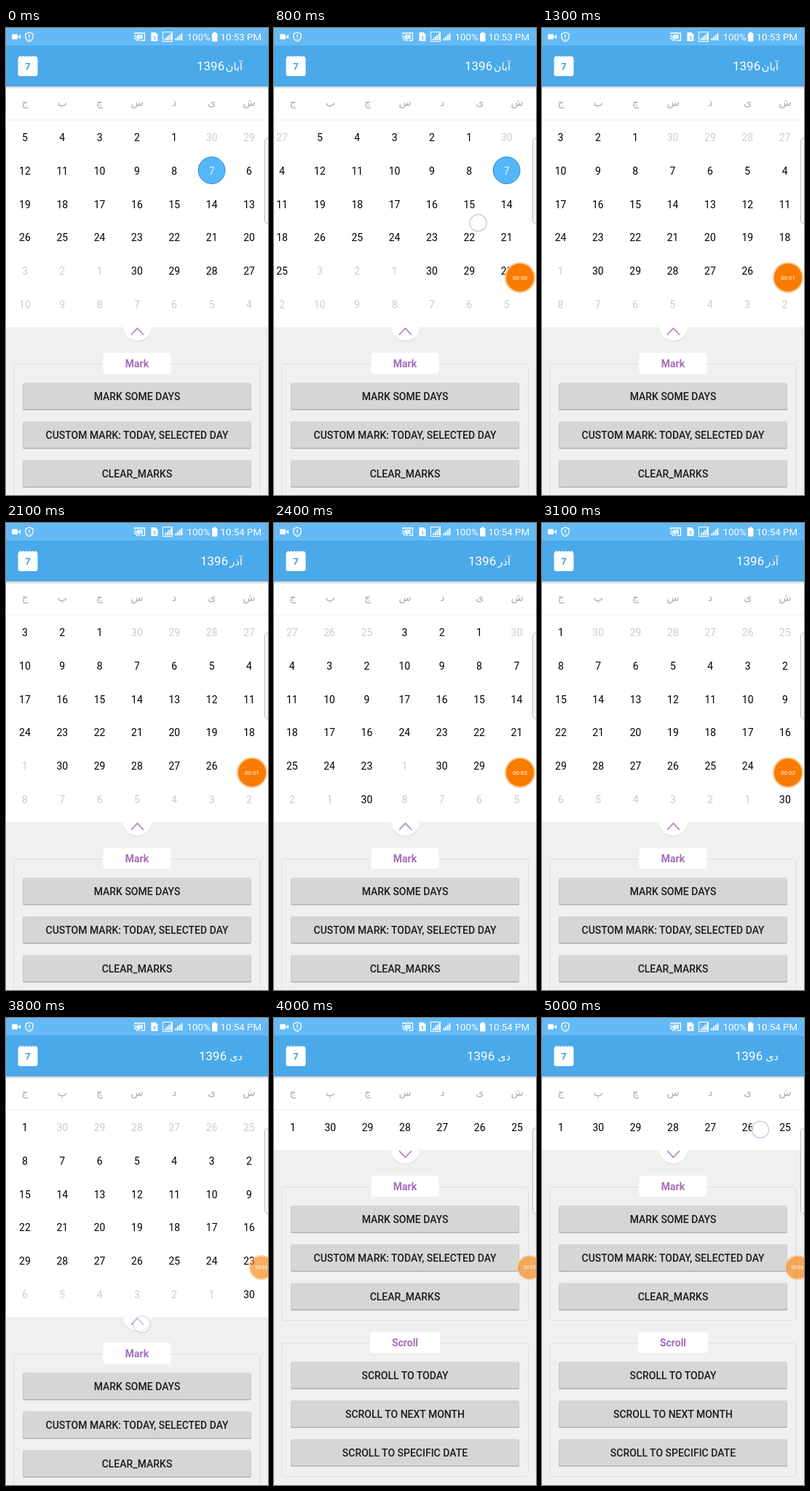
These frames come from a looping animation (360 by 640 pixels, 5.1 s). An HTML page:

```html
<!DOCTYPE html>
<html lang="en">
<head>
<meta charset="utf-8">
<title>Calendar swipe</title>
<style>
  html, body { margin: 0; width: 100%; height: 100%; overflow: hidden; background: #f0f0f0; }
  svg { display: block; width: 360px; height: 640px; font-family: Roboto, "DejaVu Sans", sans-serif; }
  .mid { text-anchor: middle; }
  .end { text-anchor: end; }
  .bold { font-weight: 700; }
  .arabic { font-family: "DejaVu Sans", sans-serif; }
</style>
</head>
<body>
<svg id="stage" viewBox="0 0 360 640">
  <defs>
    <linearGradient id="shade" x2="0" y2="1">
      <stop stop-color="#000" stop-opacity=".2"/>
      <stop offset="1" stop-color="#000" stop-opacity="0"/>
    </linearGradient>
  </defs>
</svg>
<script>
const LOOP = 5100, FRAME = 100, WIDTH = 360;
const stage = document.getElementById('stage');

function add(parent, tag, attrs = {}, text) {
  const el = document.createElementNS('http://www.w3.org/2000/svg', tag);
  for (const key in attrs) el.setAttribute(key, attrs[key]);
  if (text !== undefined) el.textContent = text;
  return parent.appendChild(el);
}
const rect = (p, x, y, width, height, fill, rx = 0, more = {}) =>
  add(p, 'rect', { x, y, width, height, fill, rx, ...more });
const label = (p, x, y, size, fill, text, cls = 'mid') =>
  add(p, 'text', { x, y, 'font-size': size, fill, class: cls }, text);
const path = (p, d, attrs) => add(p, 'path', { d, fill: 'none', ...attrs });
const circle = (p, cx, cy, r, attrs) => add(p, 'circle', { cx, cy, r, ...attrs });

const columnX = c => 334 - c * 51.35;
const rowY = r => 150.2 + r * 45.7;

// Calendar
rect(stage, 0, 80, 360, 335, '#fff');
[...'شیدسچپج'].forEach((day, c) => label(stage, columnX(c), 107, 14, '#ababab', day, 'mid arabic'));
rect(stage, 0, 125.5, 360, 1, '#eeeeee');

function addPage(lead, today) {
  const page = add(stage, 'g');
  const leading = [];
  for (let i = 0; i < 42; i++) {
    const x = columnX(i % 7), y = rowY(Math.floor(i / 7));
    const n = i - lead + 1;
    const inMonth = n > 0 && n <= 30;
    const isToday = n === today;
    if (isToday) circle(page, x, y - .8, 18.4, { fill: '#55b7f8', stroke: '#2588cb' });
    const color = isToday ? '#e2f3ff' : inMonth ? '#000' : '#cccccc';
    const cell = label(page, x, y + 5, 14, color, (n + 29) % 30 + 1);
    if (n <= 0) leading.push(cell);
  }
  return { page, leading };
}
const pages = [addPage(2, 7), addPage(4), addPage(6)];

// Lower panel
const panel = add(stage, 'g');
rect(panel, 0, 410, 360, 520, '#f0f0f0');
circle(panel, 180.5, 409.8, 20, { fill: '#dddddd' });
circle(panel, 180.5, 408.6, 20, { fill: '#fff' });
const lid = rect(panel, 155, 385, 51, 25, '#fff');
const chevron = path(panel, '', { stroke: '#b182c7', 'stroke-width': 1.8 });

function addGroup(top, title, titleWidth, buttons) {
  rect(panel, 10.5, top + .5, 339, 183, 'none', 4, { stroke: '#dedede' });
  rect(panel, 180 - titleWidth / 2, top - 15, titleWidth, 29, '#fff', 4);
  label(panel, 180, top + 5, 14, '#a66dbd', title, 'mid bold');
  buttons.forEach((text, i) => {
    const y = top + 26 + i * 53;
    rect(panel, 23, y + 1, 314, 37, '#bcbcbc', 2);
    rect(panel, 23.5, y, 313, 36, '#d6d6d6', 2);
    add(panel, 'text', { x: 180, y: y + 23.5, 'font-size': 14, 'font-weight': 500, fill: '#1c1c1c', class: 'mid' }, text);
  });
}
addGroup(460, 'Mark', 93, ['MARK SOME DAYS', 'CUSTOM MARK: TODAY, SELECTED DAY', 'CLEAR_MARKS']);
addGroup(674, 'Scroll', 96, ['SCROLL TO TODAY', 'SCROLL TO NEXT MONTH', 'SCROLL TO SPECIFIC DATE']);

// App bar
rect(stage, 0, 80, 360, 4, 'url(#shade)');
rect(stage, 0, 24, 360, 56, '#4aa9e9');
rect(stage, 0, 0, 360, 24, '#64baf5');
rect(stage, 16.5, 39.5, 27, 26.5, '#fff', 3);
for (let i = 0; i < 6; i++) circle(stage, 19.5 + i * 4.2, 40, 1.8, { fill: '#fff' });
label(stage, 30, 57, 13, '#3d9fe3', '7', 'mid bold');
const year = label(stage, 262, 58, 17, '#fff', '1396', '');
const month = label(stage, 325, 57.5, 14.5, '#fff', '', 'end arabic');

// Status bar
const thin = { stroke: '#fff', 'stroke-width': 1.3 };
rect(stage, 8, 8.5, 8, 7, '#fff', 1);
path(stage, 'M16 12l4-3v6z', { fill: '#fff' });
path(stage, 'M32 6l5 2v4q0 4-5 6.500q-5-2.500-5-6.500v-4zM32 9v4M32 14.500v1.500', thin);
path(stage, 'M177 9v-2h13.500v10h-5M176 11q6 0 7 7M176 14q3.500 0 4 4', thin);
rect(stage, 180, 9, 8, 6, '#fff', 0, { opacity: .75 });
path(stage, 'M199.500 6h6l3 3v9h-9z', { fill: '#fff' });
label(stage, 204, 15.5, 8, '#58aeea', '1', 'mid bold');
rect(stage, 215.5, 5.5, 13, 13, 'none', 0, { stroke: '#fff' });
for (const x of [218, 232.5])
  for (let i = 0; i < 4; i++) rect(stage, x + i * 2.7, 14 - i * 2.3, 1.8, 3 + i * 2.3, '#fff');
label(stage, 248.5, 17, 13.3, '#fff', '100%', '');
rect(stage, 283, 7, 7.5, 11.5, '#fff', 1);
rect(stage, 285, 5.5, 3.5, 2, '#fff');
const clock = label(stage, 351, 17, 13.3, '#fff', '', 'end');

// Overlays
rect(stage, 355.5, 150.5, 12, 118, '#f7f7f7', 5, { stroke: '#bdbdbd' });
const badge = add(stage, 'g');
circle(badge, 0, 0, 21, { fill: '#fbc58c' });
circle(badge, 0, 0, 19, { fill: '#f97b00' });
const timer = label(badge, 0, 2.8, 8, '#fff', '');
const finger = circle(stage, 0, 0, 11.5, { fill: '#fff', 'fill-opacity': .65, stroke: '#cdcce3', 'stroke-width': 1.5 });

// Held steps: time followed by values
const swipes = [
  { drag: 750, release: 820, length: 650, shift: 42 },
  { drag: 2250, release: 2340, length: 800, shift: 55 }
];
const touches = [
  [0], [500, 198, 283], [700, 214, 280], [800, 280.5, 267], [900],
  [2200, 198, 283], [2300, 275, 268], [2400],
  [3400, 187, 420], [3900], [4800, 299, 156], [5000, 300, 153]
];
const titles = [[0, 'آبان', 262], [1500, 'آذر', 267], [3300, 'دی', 265]];
const at = (steps, t) => steps.filter(s => s[0] <= t).pop();
const progress = (t, from, to) => Math.min(1, Math.max(0, (t - from) / (to - from)));

function swipeOffset(t, { drag, release, length, shift }) {
  if (t < drag) return 0;
  if (t < release) return 37;
  return WIDTH - (WIDTH - shift) * (1 - progress(t, release, release + length)) ** 5;
}

function draw(t) {
  const scroll = swipes.reduce((sum, s) => sum + swipeOffset(t, s), 0);
  const collapsed = t >= 4000;
  pages.forEach(({ page }, i) => page.setAttribute('transform', `translate(${scroll - i * WIDTH})`));
  pages[2].leading.forEach(cell => cell.setAttribute('fill', collapsed ? '#000' : '#cccccc'));

  const lift = -229 * progress(t, 3820, 3960);
  panel.setAttribute('transform', `translate(0 ${lift})`);
  lid.setAttribute('visibility', 'hidden');
  chevron.setAttribute('d', collapsed ? 'M172 411l8.500 9 8.500-9' : 'M172 420.500l8.500-9 8.500 9');

  const [, name, yearX] = at(titles, t);
  month.textContent = name;
  year.setAttribute('x', yearX);
  clock.textContent = t < 2100 ? '10:53 PM' : '10:54 PM';

  const dock = progress(t, 3200, 3500);
  badge.setAttribute('transform', `translate(${338 + 13 * dock} 342) scale(${1 - .18 * dock})`);
  badge.setAttribute('opacity', progress(t, 0, 300) * (1 - .38 * dock));
  timer.textContent = '00:0' + Math.max(0, Math.floor((t - 200) / 1000));

  const [, x, y] = at(touches, t);
  finger.setAttribute('visibility', x ? 'visible' : 'hidden');
  if (x) finger.setAttribute('transform', `translate(${x} ${y})`);
  finger.setAttribute('opacity', t >= 3700 && t < 3900 ? .7 : 1);
}

const start = performance.now();
function tick() {
  const t = (performance.now() - start) % LOOP;
  draw(Math.floor(t / FRAME) * FRAME);
  requestAnimationFrame(tick);
}
tick();
</script>
</body>
</html>
```
